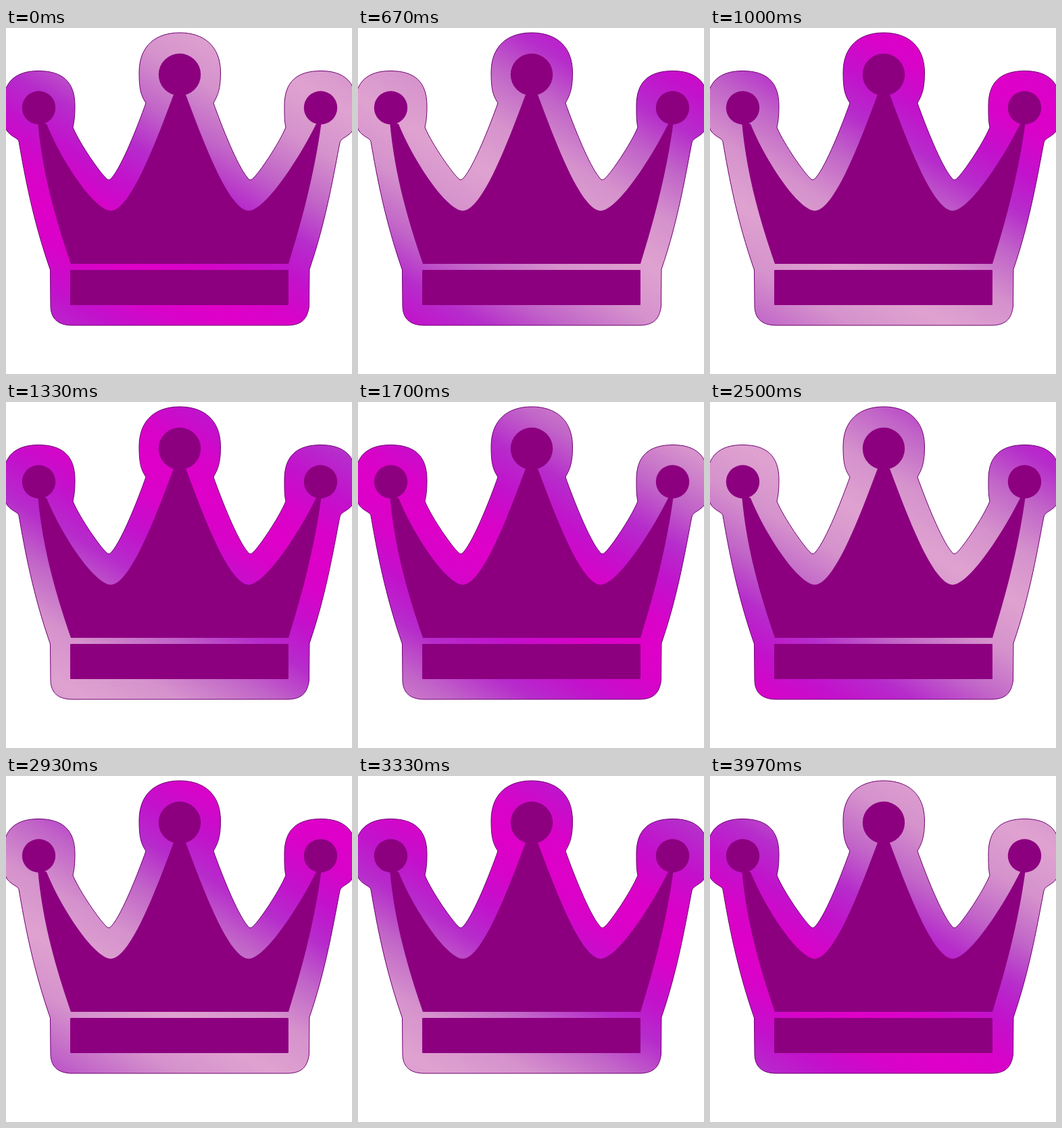
An HTML page that plays this animation: 512 px wide and 512 px high, repeating every 4 s.

```html
<!DOCTYPE html>
<html lang="en">
<head>
<meta charset="utf-8">
<title>Crown</title>
<style>
  html, body { margin: 0; width: 100%; height: 100%; overflow: hidden; background: #fff; }
  svg { display: block; width: 100vw; height: 100vh; }
</style>
</head>
<body>
<svg viewBox="0 0 512 512">
  <defs>
    <linearGradient id="sheen" gradientUnits="userSpaceOnUse" spreadMethod="reflect">
      <stop offset="0" stop-color="#dfa2d0"/>
      <stop offset=".2" stop-color="#d592cc"/>
      <stop offset=".4" stop-color="#c164c8"/>
      <stop offset=".57" stop-color="#b62ccb"/>
      <stop offset=".72" stop-color="#c212cc"/>
      <stop offset=".88" stop-color="#d803c8"/>
      <stop offset="1" stop-color="#de00c8"/>
    </linearGradient>
  </defs>
  <path fill="url(#sheen)" stroke="#6c0070" stroke-width="1" stroke-linejoin="round" d="
    M19 168 C18 163 8 161 2 153 C-3 146 -4 130 -4 112
    C-4 80 14 63.500 48 63.500 C84 63.500 102 80 102 115 C102 130 101 138 99 147
    C110 173 140 215 148 222 Q152 228 157 221 C172 203 195 145 207 111
    C200 100 197 92 197 66 C197 26 222 7 257 7 C292 7 317.500 26 317.500 66
    C317.500 92 313 100 307 111
    C319 145 342 203 357 221 Q361 228 366 222 C374 215 403 173 414 147
    C412 138 412 130 412 115 C412 80 430 63.500 466 63.500
    C500 63.500 518 80 518 112 C518 130 517 146 512 153 C506 161 495 163 494 170
    C486 210 474 285 449 357 L448.500 412 C446 431 437 440 416 440
    L98 440 C78 440 66.500 431 66 412 L65.500 358 C40 285 28 220 19 168 Z"/>
  <g fill="#8c0080">
    <circle cx="48.500" cy="118" r="24.700"/>
    <circle cx="257" cy="69" r="31.200"/>
    <circle cx="465.500" cy="118" r="24.700"/>
    <path d="M47 138 C53 205 68 268 96 349 L418 349 C443 268 458 205 467 138 L459 142
      C432 196 384 269 359 270.500 C329 269 291 165 265 96 L249 96
      C223 165 185 269 155 270.500 C130 269 82 196 60 142 Z"/>
    <rect x="95" y="358" width="323" height="52" rx="1"/>
  </g>
</svg>
<script>
  const LOOP = 4000, CYCLE = 2000, WAVE = 700, START = -145;
  const AXIS = { x: -0.5, y: 0.866 };
  const sheen = document.getElementById('sheen');

  // Steps land at 0, 30 and 70 ms of every tenth of a second.
  function stepTime(t) {
    const r = t % 100;
    const k = 3 * Math.floor(t / 100) + (r >= 30) + (r >= 70);
    return k * 100 / 3;
  }

  function setEnd(n, pos) {
    sheen.setAttribute('x' + n, AXIS.x * pos);
    sheen.setAttribute('y' + n, AXIS.y * pos);
  }

  function draw(now) {
    const phase = stepTime(now % LOOP) % CYCLE / CYCLE;
    const pos = START + WAVE * phase;
    setEnd(1, pos);
    setEnd(2, pos + WAVE / 2);
  }

  const begin = performance.now();
  function tick() {
    draw(performance.now() - begin);
    requestAnimationFrame(tick);
  }
  tick();
</script>
</body>
</html>
```
